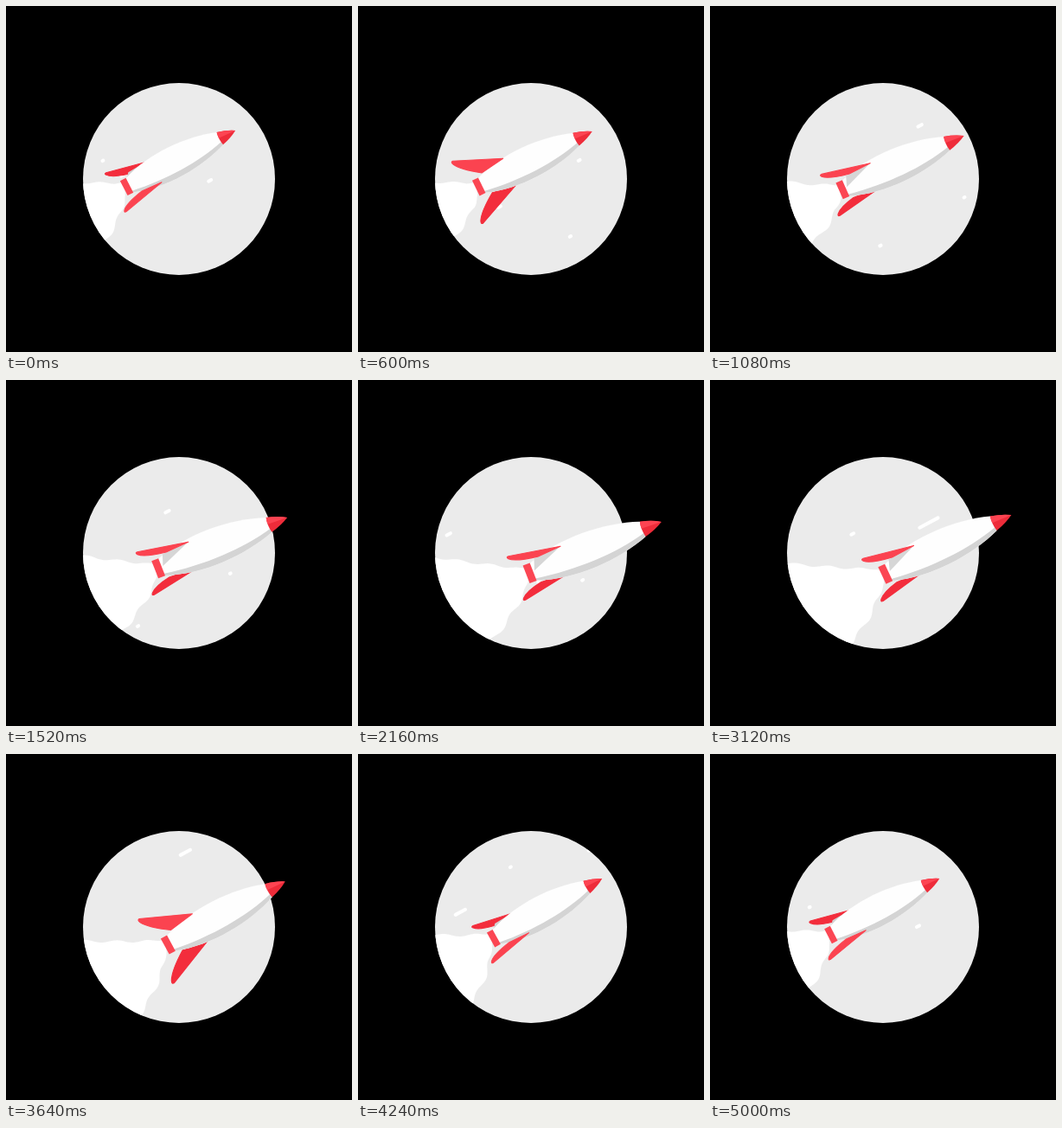
Animation of 400x400 px, one loop 5.04 s. Source, as an HTML page with a canvas:

```html
<!DOCTYPE html>
<html lang="en">
<head>
<meta charset="utf-8">
<title>Rocket</title>
<style>
html, body { margin: 0; width: 100%; height: 100%; overflow: hidden; background: #000; }
canvas { display: block; }
</style>
</head>
<body>
<canvas id="stage" width="400" height="400"></canvas>
<script>
const ctx = document.getElementById('stage').getContext('2d');
const LOOP = 5040, TAU = Math.PI * 2, DEG = Math.PI / 180;
const C = 200, R = 111, STREAKS = 11;

const random = n => {
  const v = Math.sin(n * 12.9898) * 43758.5453;
  return v - Math.floor(v);
};

// Loop angle that lingers near both ends of the swing
const easedAngle = t => {
  const a = TAU * t / LOOP;
  return a - .17 * Math.sin(2 * a);
};

// Smooth swing from low to high and back, delayed by some degrees
const swing = (a, low, high, delay) =>
  low + (high - low) * (1 - Math.cos(a - delay * DEG)) / 2;

// 0..1 hump around a peak given in degrees; higher power is narrower
const hump = (a, peak, power) => ((1 + Math.cos(a - peak * DEG)) / 2) ** power;

const drift = t => 30 * Math.cos(TAU * t / LOOP);

function fill(color, path) {
  ctx.fillStyle = color;
  ctx.fill(new Path2D(path));
}

function drawStreak(t, i) {
  const size = random(i + 3), offset = 180 * random(i + 40) - 90;
  const passing = (i + .5) * LOOP / STREAKS;
  let dt = t - passing;
  dt -= LOOP * Math.round(dt / LOOP);
  const along = (.07 + .12 * size) * dt, half = .5 + 13 * size ** 4;
  const x = C + .47 * offset - .88 * along;
  const y = C + .88 * offset + .47 * along + drift(t) - drift(passing);
  ctx.beginPath();
  ctx.moveTo(x - .88 * half, y + .47 * half);
  ctx.lineTo(x + .88 * half, y - .47 * half);
  ctx.stroke();
}

// Points of a billowing edge whose waves travel away from the tail
function billow(t, x0, y0, x1, y1, bulge, amp) {
  const dist = Math.hypot(x1 - x0, y1 - y0), points = [];
  const nx = (y1 - y0) / dist, ny = (x0 - x1) / dist;
  for (let i = 0; i <= 40; i++) {
    const k = i / 40;
    const wave = Math.sin(TAU * (k * dist / 37 - 8 * t / LOOP));
    const off = 4 * bulge * k * (1 - k) + amp * wave * Math.min(1, 4 * k);
    points.push([x0 + (x1 - x0) * k + nx * off, y0 + (y1 - y0) * k + ny * off]);
  }
  return points;
}

function drawSmoke(t, a, x, y) {
  const top = 203 + 13 * hump(a, 255, 3);
  const low = swing(a, 111, 163, 30);
  const lowY = C + Math.sqrt(R * R - (C - low) ** 2);
  const upper = billow(t, x - 3, y - 5, 87, top, 1, 1.4).reverse();
  const lower = billow(t, x - 2, y + 10, low, lowY, 4, 2.2);
  ctx.fillStyle = '#fff';
  ctx.beginPath();
  [...upper, ...lower, [80, 330], [60, 200]].forEach(p => ctx.lineTo(...p));
  ctx.fill();
}

// side: -1 upper, 1 lower
function drawFin(side, roll, color) {
  const tilt = Math.sin(roll), tip = 39 * Math.cos(roll);
  const root = 17 - 4 * Math.abs(tilt), rear = 10 - 4 * side * tilt;
  const path = new Path2D(`M38 ${side * root}L-14 ${side * tip}
    Q-17 ${side * tip} -15 ${side * tip * .9}
    Q-10 ${side * tip * .67} ${rear} ${side * 12.5}Z`);
  ctx.fillStyle = ctx.strokeStyle = color;
  ctx.lineWidth = 1;
  ctx.lineJoin = 'round';
  ctx.fill(path);
  ctx.stroke(path);
}

function drawRocket(x, y, tipX, tipY, roll) {
  const tilt = Math.sin(roll), near = tilt > -.3 ? -1 : 1;
  const scale = Math.hypot(tipX - x, tipY - y) / 141;
  ctx.save();
  ctx.translate(x, y);
  ctx.rotate(Math.atan2(tipY - y, tipX - x));
  ctx.scale(scale, scale);
  drawFin(-near, roll, '#f32d3c');
  if (near > 0) fill('#d2d2d2', `M28-15L9 ${-11 + 4 * tilt}L4-8Z`);
  fill('#fefefe', 'M3-9C40-23 88-20 121-8V8C88 20 40 23 3 9Z');
  fill('#d4d4d4', 'M3 9C40 23 88 20 121 8V4C88 13 45 14 3 7Z');
  if (tilt > 0) fill('#d6d6d6', `M37-13.5L9-12L5 ${-11 + 13 * tilt}Z`);
  drawFin(near, roll, '#fb4350');
  fill('#fb4653', 'M-4-9.5H3.5V9.5H-4Z');
  fill('#ee2c3a', 'M121-8Q133-5 141 0Q133 5 121 8Q119 0 121-8Z');
  fill('#fc4452', 'M121-8Q133-5 141 0L120-1Q120-5 121-8Z');
  ctx.restore();
}

function draw(t) {
  const a = easedAngle(t);
  const x = swing(a, 138.5, 204.5, 16), y = swing(a, 208.5, 224.5, 16);
  const tipX = swing(a, 265, 354, 4), tipY = 144 + 20 * hump(a, 157, 2);
  const roll = 53 * DEG * Math.tanh(3.5 * (Math.cos(a - 145 * DEG) + .34));

  ctx.clearRect(0, 0, 400, 400);
  ctx.save();
  ctx.beginPath();
  ctx.arc(C, C, R, 0, TAU);
  ctx.fillStyle = '#ebebeb';
  ctx.fill();
  ctx.clip();
  drawSmoke(t, a, x, y);
  ctx.strokeStyle = '#fff';
  ctx.lineCap = 'round';
  ctx.lineWidth = 4;
  for (let i = 0; i < STREAKS; i++) drawStreak(t, i);
  ctx.restore();
  drawRocket(x, y, tipX, tipY, roll);
}

const start = performance.now();
function tick() {
  draw((performance.now() - start) % LOOP);
  requestAnimationFrame(tick);
}
tick();
</script>
</body>
</html>
```
